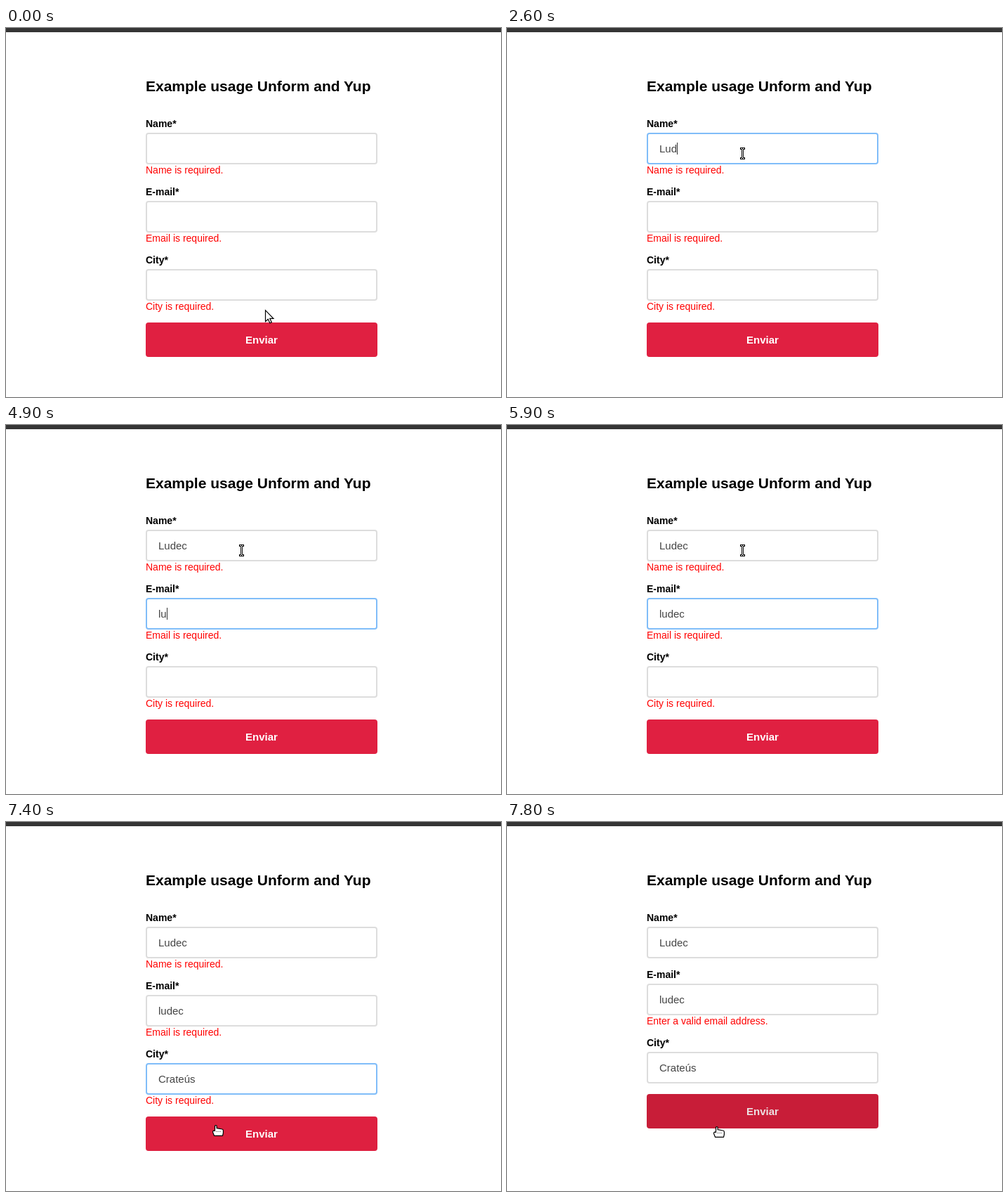
Write an HTML page that moves like this. It is 705 px wide and 525 px high and loops after 8000 ms.

```html
<!DOCTYPE html>
<html lang="en">
<head>
<meta charset="utf-8">
<title>Form validation</title>
<style>
  html, body { margin: 0; width: 100%; height: 100%; overflow: hidden; background: #fff; }
  body { position: relative; font: 14px/16px "Liberation Sans", Arial, sans-serif; color: #000; }
  .bar { position: absolute; left: 0; top: 0; width: 100%; height: 6px; background: #353535; }
  h1 { position: absolute; left: 199px; top: 71px; margin: 0; font-size: 21px; line-height: 24px; white-space: nowrap; }
  .form { position: absolute; left: 199px; top: 128px; width: 330px; }
  .field { margin-bottom: 15px; }
  .label { font-weight: bold; margin-bottom: 5px; }
  .input { box-sizing: border-box; height: 45px; border: 2px solid #ddd; border-radius: 4px;
           padding: 12px 16px; font-size: 15px; line-height: 17px; color: #444; white-space: pre; }
  .input * { pointer-events: none; }
  .caret { display: inline-block; width: 1px; height: 17px; margin-right: -1px; vertical-align: top; background: #333; }
  .error { color: #f00; }
  .button { height: 49px; border-radius: 4px; font-size: 15px; font-weight: bold; line-height: 49px; text-align: center; }
  svg { position: absolute; left: 0; top: 0; width: 24px; height: 24px; overflow: visible; pointer-events: none; }
</style>
</head>
<body>
<div class="bar"></div>
<h1>Example usage Unform and Yup</h1>
<div class="form"></div>

<svg id="arrow"><path d="M.5 .7V16.6L4.2 13.2L6.8 18.8L9.3 17.7L6.8 12.3H11.9Z" fill="#fff" stroke="#000" stroke-width="1.2"/></svg>
<svg id="beam">
  <path d="M-3 -8H4V-5H2V6H4V9H-3V6H-1V-5H-3Z"/>
  <path d="M-2 -6.5H0M1 -6.5H3M.5 -6V7M-2 7.5H0M1 7.5H3" fill="none" stroke="#fff"/>
</svg>
<svg id="hand"><g transform="translate(-5 0)">
  <path d="M3.5 8.5V1.8Q3.5 .6 4.8 .6T6.1 1.8V4.7L13.8 6Q15.4 6.5 15.4 8V11.5L14.5 15.4H2.6L.6 10.6Q.3 8.2 2 8.2Z"
        fill="#fff" stroke="#000" stroke-width="1.2" stroke-linejoin="round"/>
  <path d="M5 9.5H13" fill="none" stroke="#555" stroke-dasharray="1 1"/>
</g></svg>

<script>
const LOOP = 8000, TICK = 100;       // the picture is refreshed ten times a second
const BORDER_FADE = 150, HOVER_FADE = 200;
const GREY = [221, 221, 221], BLUE = [128, 189, 249];
const RED = [224, 32, 65], DARK_RED = [200, 29, 56];
const WHITE = [255, 255, 255], DIM_WHITE = [236, 225, 226];
const HOVER = 7365, VALIDATED = 7800;

// Tracks are lists of [start time, value]; a value holds until the next entry.
const fields = [
  { label: 'Name*', focusIn: 1520, focusOut: 2980,
    text: [[0, ''], [2300, 'L'], [2500, 'Lu'], [2600, 'Lud'], [2800, 'Ludec']],
    caret: [[0, 0], [1600, 1], [2100, 0], [2300, 1], [3000, 0]],
    error: [[0, 'Name is required.'], [VALIDATED, '']] },
  { label: 'E-mail*', focusIn: 2980, focusOut: 6020,
    text: [[0, ''], [4900, 'lu'], [5100, 'lud'], [5200, 'lude'], [5300, 'ludec']],
    caret: [[0, 0], [3000, 1], [3700, 0], [4200, 1], [5900, 0]],
    error: [[0, 'Email is required.'], [VALIDATED, 'Enter a valid email address.']] },
  { label: 'City*', focusIn: 6020, focusOut: 7540,
    text: [[0, ''], [6700, 'Crateús']],
    caret: [[0, 0], [6100, 1], [7200, 0]],
    error: [[0, 'City is required.'], [VALIDATED, '']] }
];

// Pointer stops: [time, x, y], with eased travel in between.
const stops = [
  [0, 369, 401], [500, 369, 401], [600, 352, 158], [700, 352, 158], [1000, 335, 178],
  [7000, 335, 178], [7400, 299, 431], [7500, 299, 433], [LOOP, 299, 433]
];

const at = (track, t) => track.findLast(step => step[0] <= t)[1];
const ease = k => k * k * (3 - 2 * k);
const fade = (t, start, length) => ease(Math.min(1, Math.max(0, (t - start) / length)));
const lerp = (a, b, k) => Math.round(a + (b - a) * k);
const mix = (from, to, k) => `rgb(${from.map((c, i) => lerp(c, to[i], k))})`;

function pointerAt(t) {
  const next = stops.findIndex(stop => stop[0] > t);
  const [t0, x0, y0] = stops[next - 1], [t1, x1, y1] = stops[next];
  const k = fade(t, t0, t1 - t0);
  return [lerp(x0, x1, k), lerp(y0, y1, k)];
}

function pointerShape(x, y) {
  const under = document.elementFromPoint(x, y);
  return { input: 'beam', button: 'hand' }[under && under.className] || 'arrow';
}

function add(parent, className, text = '') {
  const node = document.createElement('div');
  node.className = className;
  node.textContent = text;
  return parent.appendChild(node);
}

const form = document.querySelector('.form');
for (const field of fields) {
  const box = add(form, 'field');
  add(box, 'label', field.label);
  field.input = add(box, 'input');
  field.value = field.input.appendChild(document.createElement('span'));
  field.cursor = field.input.appendChild(document.createElement('i'));
  field.cursor.className = 'caret';
  field.message = add(box, 'error');
}
const button = add(form, 'button', 'Enviar');
const pointers = document.querySelectorAll('svg');

function render(t) {
  for (const f of fields) {
    const focus = fade(t, f.focusIn, BORDER_FADE) - fade(t, f.focusOut, BORDER_FADE);
    f.input.style.borderColor = mix(GREY, BLUE, focus);
    f.value.textContent = at(f.text, t);
    f.message.textContent = at(f.error, t);
    f.cursor.style.visibility = at(f.caret, t) ? 'visible' : 'hidden';
  }
  const hover = fade(t, HOVER, HOVER_FADE);
  button.style.background = mix(RED, DARK_RED, hover);
  button.style.color = mix(WHITE, DIM_WHITE, hover);

  const [x, y] = pointerAt(t);
  const shape = pointerShape(x, y);
  for (const p of pointers) {
    p.style.display = p.id === shape ? 'block' : 'none';
    p.style.transform = `translate(${x}px, ${y}px)`;
  }
}

const start = performance.now();
function tick() {
  const t = (performance.now() - start) % LOOP;
  render(Math.floor(t / TICK) * TICK);
  requestAnimationFrame(tick);
}
tick();
</script>
</body>
</html>
```
